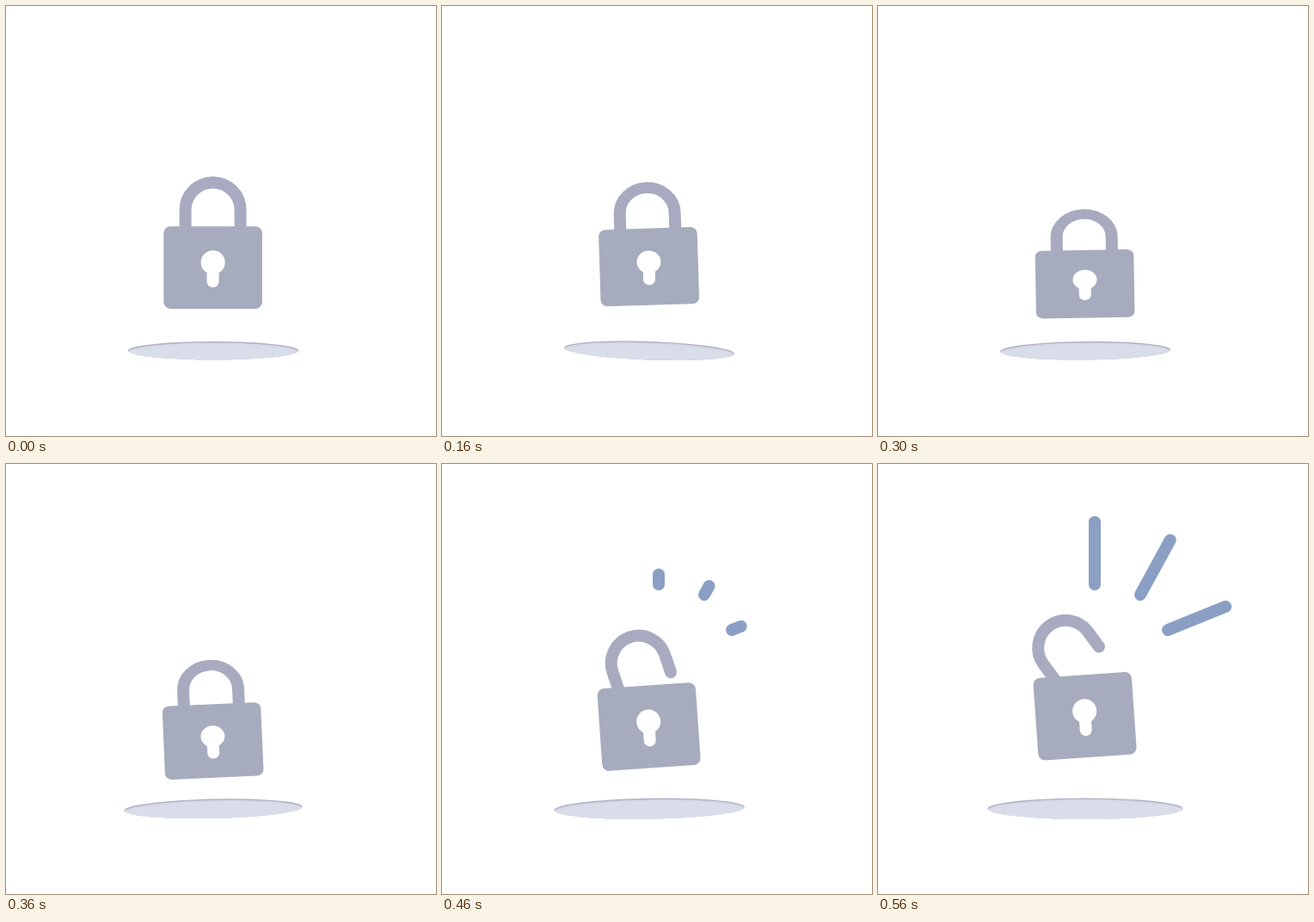
Write an HTML page with a canvas that moves like this. It is 500x500 px and loops after 800 ms.

```html
<!DOCTYPE html>
<html lang="en">
<head>
<meta charset="utf-8">
<title>Padlock opening</title>
<style>
html, body { margin: 0; width: 100%; height: 100%; overflow: hidden; background: #fff; }
canvas { display: block; }
</style>
</head>
<body>
<canvas id="stage" width="500" height="500"></canvas>
<script>
const ctx = document.getElementById('stage').getContext('2d');
const LOOP = 800, STEP = 20, REST = 560;
const RAD = Math.PI / 180;
const SHADE = '#d9dde9', RIM = '#b3b0c4', SOFT_RIM = '#d3d4e4';
const BODY = '#a6acbe', SHACKLE = '#a8abc0', RAY = '#8b9fc5';

// Progress of t from a to b, held at 0 and 1 outside.
const ramp = (t, a, b) => Math.min(1, Math.max(0, (t - a) / (b - a)));

function ease(t, a, b) {
  const u = ramp(t, a, b);
  return u * u * (3 - 2 * u);
}

const easeOut = (t, a, b) => Math.sin(ramp(t, a, b) * Math.PI / 2);

// The lock crouches until 300 ms, then springs up.
const lockY = t => 304.2 - ease(t, 0, 100) + 20 * ease(t, 181, 300) - 30 * ease(t, 333, REST);
const squash = t => 1 - 0.07 * ease(t, 0, 100) - 0.11 * ease(t, 200, 300) + 0.18 * ease(t, 300, 440);
const lean = t => 0.4 * ease(t, 0, 100) - 4.4 * ease(t, 100, 220) + 3 * ease(t, 220, 300) - 3 * ease(t, 300, 420);
const swing = t => -32.5 * ramp(t, 375, REST);

const tilt = t => 2 * ease(t, 0, 100) - 2.6 * ease(t, 220, 300) - 1.3 * ease(t, 300, 420) + 1.9 * ease(t, 400, 520);
const spread = t => 99 + 14.5 * easeOut(t, 310, REST);

function line(x0, y0, x1, y1) {
  ctx.beginPath();
  ctx.moveTo(x0, y0);
  ctx.lineTo(x1, y1);
  ctx.stroke();
}

function oval(rx, ry, dy, color) {
  ctx.fillStyle = color;
  ctx.beginPath();
  ctx.ellipse(0, dy, rx, ry, 0, 0, 2 * Math.PI);
  ctx.fill();
}

function drawShadow(t) {
  const rx = spread(t), ry = rx * 0.108;
  ctx.save();
  ctx.translate(241, 400.7);
  ctx.rotate(tilt(t) * RAD);
  oval(rx, ry, 0, RIM);
  ctx.clip();
  oval(rx, ry, 1.4, SOFT_RIM);
  oval(rx, ry, 3, SHADE);
  ctx.restore();
}

// The shackle turns about the foot of its left leg.
function drawShackle(t) {
  ctx.save();
  ctx.translate(-32, -45);
  ctx.rotate(swing(t) * RAD);
  ctx.strokeStyle = SHACKLE;
  ctx.beginPath();
  ctx.moveTo(0, 0);
  ctx.lineTo(0, -22);
  ctx.arc(32, -22, 32, Math.PI, 0);
  ctx.lineTo(64, 0);
  ctx.stroke();
  ctx.restore();
}

function drawLock(t) {
  ctx.save();
  ctx.translate(240.6, lockY(t));
  ctx.rotate(lean(t) * RAD);
  ctx.scale(1, squash(t));
  drawShackle(t);
  ctx.fillStyle = BODY;
  ctx.beginPath();
  ctx.roundRect(-57.3, -48, 114.6, 96, 8);
  ctx.fill();
  oval(14, 14, -6, '#fff');
  ctx.strokeStyle = '#fff';
  line(0, -4, 0, 16);
  ctx.restore();
}

function drawRay(x, y, angle, length) {
  line(x, y, x + length * Math.sin(angle * RAD), y - length * Math.cos(angle * RAD));
}

function drawRays(t) {
  const length = 72.5 * ramp(t, 445, 540);
  if (!length) return;
  ctx.strokeStyle = RAY;
  drawRay(252, 140, 0, length);
  drawRay(305, 152, 28.7, length);
  drawRay(337, 193, 68, length);
}

function draw(now) {
  const t = Math.min(REST, Math.floor(now % LOOP / STEP) * STEP);
  ctx.fillStyle = '#fff';
  ctx.fillRect(0, 0, 500, 500);
  ctx.lineWidth = 14;
  ctx.lineCap = 'round';
  drawShadow(t);
  drawLock(t);
  drawRays(t);
}

let start;
function tick(now) {
  start ??= now;
  draw(now - start);
  requestAnimationFrame(tick);
}
draw(0);
requestAnimationFrame(tick);
</script>
</body>
</html>
```
